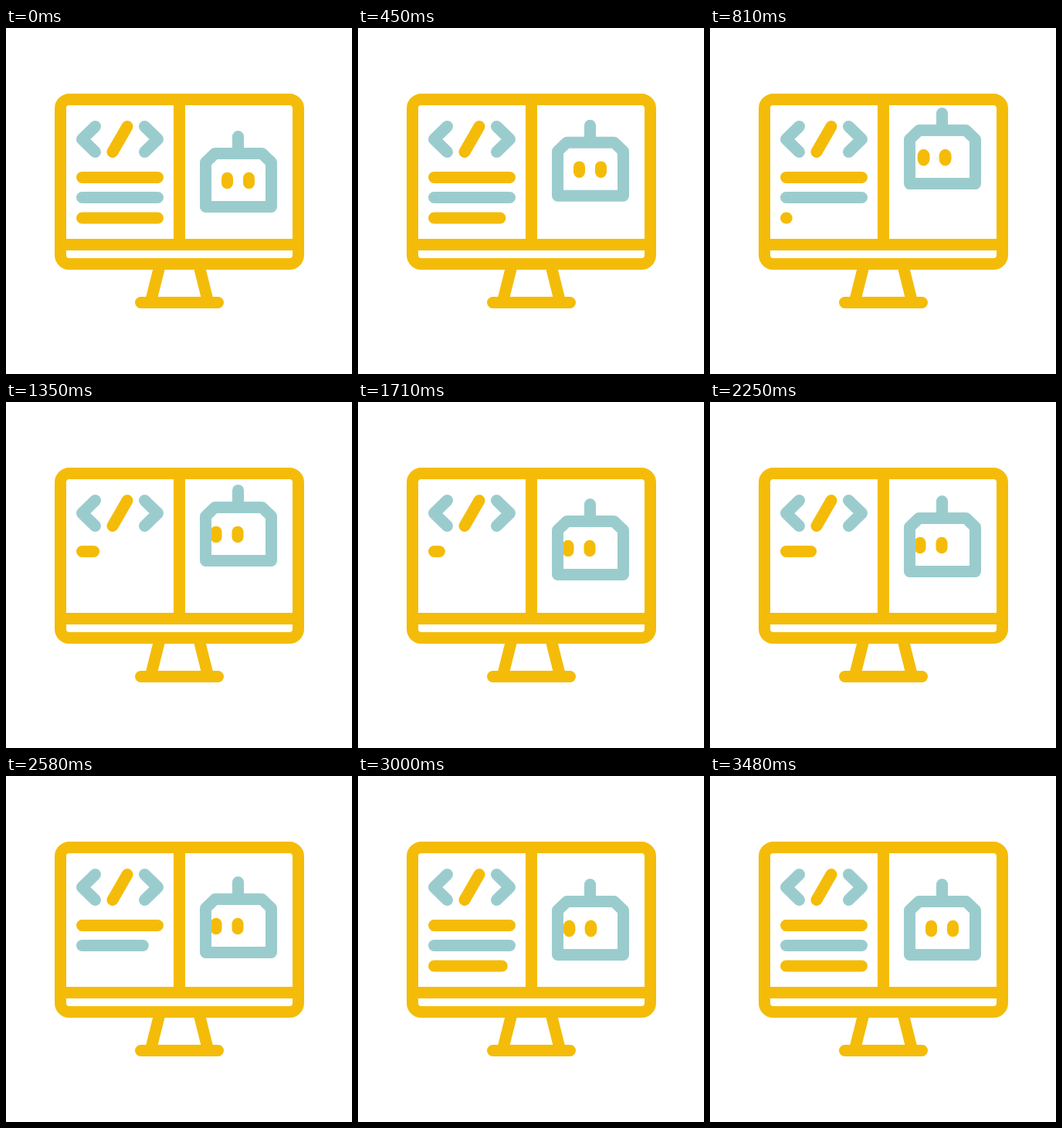
Animation, 448 px wide and 448 px high, one loop 3600 ms. Source, as an HTML page:

```html
<!DOCTYPE html>
<html lang="en">
<head>
<meta charset="utf-8">
<title>Robot coding</title>
<style>
html, body { margin: 0; width: 100%; height: 100%; overflow: hidden; background: #fff; }
svg { display: block; width: 100vw; height: 100vh; }
.line { fill: none; stroke-width: 15; stroke-linecap: round; stroke-linejoin: round; }
.gold { stroke: #f4bc08; }
.teal { stroke: #9bcccd; }
.eye { fill: #f4bc08; }
</style>
</head>
<body>
<svg viewBox="0 0 448 448">
  <g class="line gold">
    <path d="M198.5 310L188.5 350M250.5 310L260.5 350M174.5 355.5H274.5"/>
    <rect x="70.5" y="92.5" width="308" height="213" rx="11.5"/>
    <path d="M72 280.5H377M224.5 93V280"/>
    <path d="M157 127.5L138 160.5"/>
  </g>
  <path class="line teal" d="M115.5 127.5L98.5 144L115.5 160.5M179.5 127.5L196.5 144L179.5 160.5"/>
  <path class="line gold row"/>
  <path class="line teal row"/>
  <path class="line gold row"/>
  <g id="robot">
    <rect class="eye"/>
    <rect class="eye"/>
    <path class="line teal" d="M258.5 231.5V174L270.5 162.5H331.5L343.5 174V231.5ZM300.5 140.5V162"/>
  </g>
</svg>
<script>
const LOOP = 3600;
const rows = [...document.querySelectorAll('.row')];
const eyes = [...document.querySelectorAll('.eye')];
const robot = document.getElementById('robot');
const rowY = [193.5, 219.5, 246];
const eyeX = [286.5, 314.5];

const clamp = v => Math.min(1, Math.max(0, v));
const soft = u => (1 - Math.cos(Math.PI * u)) / 2;

// cubic-bezier(.8, 0, .2, 1), solved by bisection
function sharp(u) {
  let lo = 0, hi = 1;
  for (let i = 0; i < 24; i++) {
    const s = (lo + hi) / 2, r = 1 - s;
    if (2.4 * r * r * s + 0.6 * r * s * s + s * s * s < u) lo = s;
    else hi = s;
  }
  return lo * lo * (3 - 2 * lo);
}

const tween = (t, from, to, ease) => ease(clamp((t - from) / (to - from)));

function draw(t) {
  // amount of text on screen, in rows
  const typed = 3 - 2.93 * (tween(t, 60, 1680, sharp) - tween(t, 1740, 3360, sharp));
  rows.forEach((row, i) => {
    const len = clamp(typed - i);
    row.setAttribute('d', len > 0.001 ? `M98.5 ${rowY[i]}h${(98 * len + 0.01).toFixed(2)}` : '');
  });

  const lift = 30.3 * (tween(t, 60, 870, soft) - tween(t, 1140, 2010, soft))
    + 14 * (tween(t, 2010, 2330, soft) - tween(t, 2330, 2690, soft));
  robot.setAttribute('transform', `translate(0 ${(-lift).toFixed(2)})`);

  const look = tween(t, 420, 1140, sharp) - tween(t, 2760, 3480, sharp);
  const bulge = Math.min(1, 8 * look * (1 - look));
  eyes.forEach((eye, i) => {
    const w = 15 + bulge, h = 21.5 + bulge * 0.4;
    eye.setAttribute('x', eyeX[i] - 14.5 * look - w / 2);
    eye.setAttribute('y', 197.5 - h / 2);
    eye.setAttribute('width', w);
    eye.setAttribute('height', h);
    eye.setAttribute('rx', w / 2);
    eye.setAttribute('ry', 7.5 + bulge * 2);
  });
}

const start = performance.now();
function tick(now) {
  draw(Math.max(0, now - start) % LOOP);
  requestAnimationFrame(tick);
}
draw(0);
requestAnimationFrame(tick);
</script>
</body>
</html>
```
